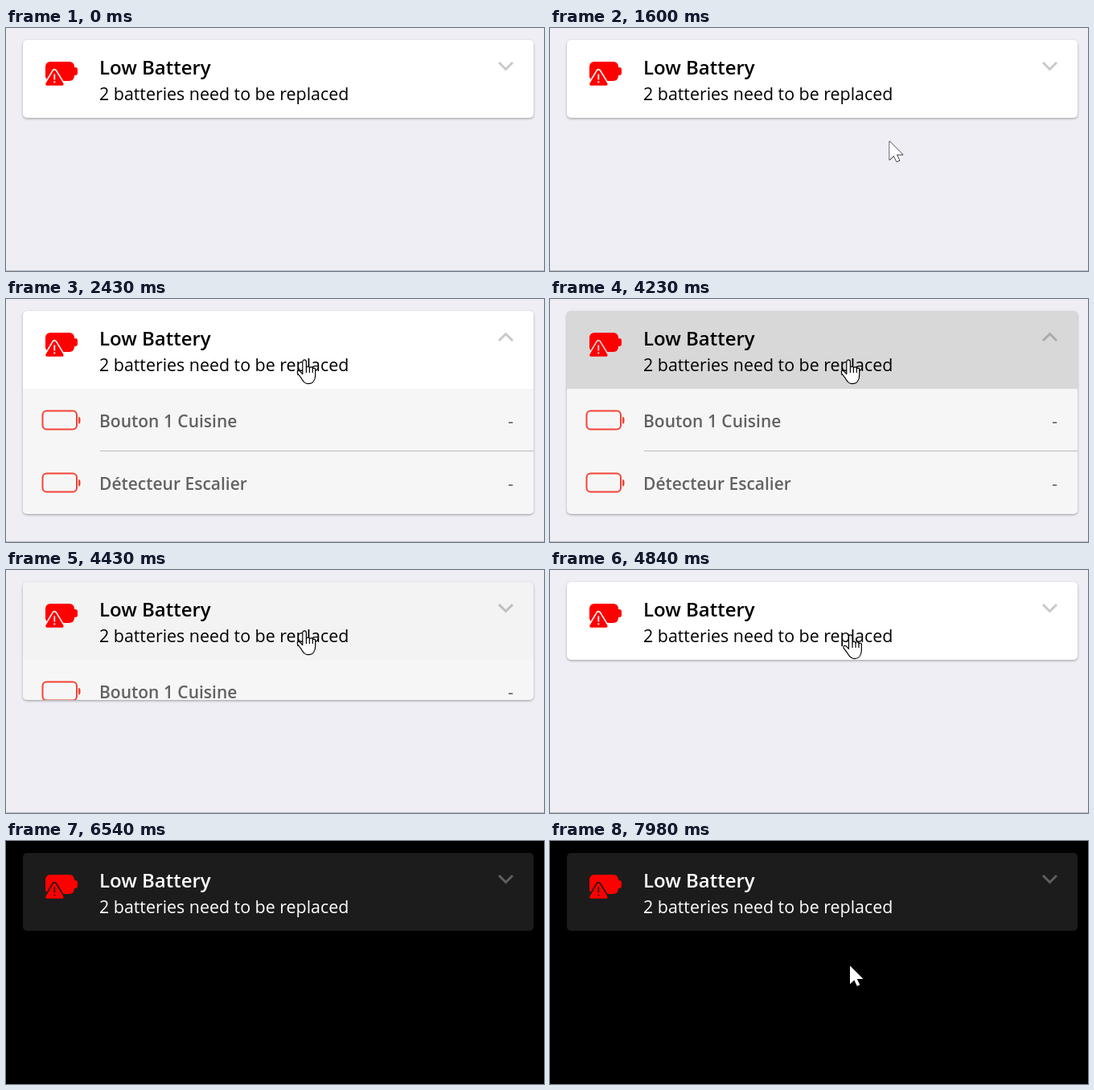
Write an HTML page with a canvas that moves like this. It is 669x303 px and loops after 8 s.

```html
<!DOCTYPE html>
<html lang="en">
<head>
<meta charset="utf-8">
<title>Low Battery card</title>
<style>
  html, body { margin: 0; width: 100%; height: 100%; overflow: hidden; background: #efeef4; }
  canvas { display: block; width: 669px; height: 303px; }
</style>
</head>
<body>
<canvas id="stage" width="669" height="303"></canvas>
<script>
const ctx = document.getElementById('stage').getContext('2d');
const LOOP = 8000;
const CARD = { x: 21, y: 15, w: 635, header: 97, list: 156 };
const LIGHT = { page: '#efeef4', header: [255, 255, 255], text: '#000', chevron: 'rgba(0,0,0,.21)' };
const DARK = { page: '#000', header: [28, 28, 28], text: '#fff', chevron: '#5e5e64' };
const PRESSED = 216;
const FONT = '"Open Sans", "Noto Sans", sans-serif';

const handShape = new Path2D('M7.8 18.5V3.2a2.3 2.3 0 0 1 4.6 0V11a2 2 0 0 1 4 .4a2 2 0 0 1 3.9 1a1.8 1.8 0 0 1 3.4 1.4V20c0 6-3 10.7-9 10.7c-4 0-6.500-3-8.500-7L1.500 17.500c-1.200-2.500 1.500-4 3.300-2.200z');
const handCreases = new Path2D('M12.4 11v6M16.400 11.400v5.600M20.300 12.400v4.600');
const arrowShape = new Path2D('M.5 .5V23.500l5.300-5 3.600 7.400 3.400-1.600-3.500-7.300h7.700z');

// CSS "ease" curve: cubic-bezier(.25, .1, .25, 1)
function ease(x) {
  if (x <= 0) return 0;
  if (x >= 1) return 1;
  let lo = 0, hi = 1, s;
  for (let i = 0; i < 24; i++) {
    s = (lo + hi) / 2;
    const bx = .75 * s * (1 - s) + s ** 3;
    if (bx < x) lo = s; else hi = s;
  }
  return .3 * s * (1 - s) ** 2 + 3 * s * s * (1 - s) + s ** 3;
}

// Index of the current step out of `count`, spread evenly from start to end
const stepAt = (t, start, end, count) =>
  Math.min(count - 1, Math.floor((t - start) / (end - start) * (count - 1) + .001));

const lerp = (a, b, p) => a + (b - a) * p;

// The panel advances every 70 ms after the press
function toggle(t, press) {
  const begin = press + 120;
  if (t < begin) return 0;
  const held = begin + Math.floor((t - begin) / 70) * 70;
  return ease((held - press - 70) / 300);
}

function cursorAt(t) {
  const rest = { x: 370, y: 76 };
  if (t >= 7350) {
    const p = 1 - (1 - stepAt(t, 7350, 7980, 10) / 9) ** 1.8;
    return { x: lerp(510, 372.5, p), y: lerp(284, 155, p) };
  }
  if (t < 1190 || t >= 5460) return null;
  if (t < 1950) {
    const p = 1 - (1 - stepAt(t, 1190, 1950, 12) / 11) ** 1.8;
    return { x: lerp(524, rest.x, p), y: lerp(269, rest.y, p) };
  }
  if (t < 4840) return rest;
  const u = (stepAt(t, 4840, 5460, 10) + 1) / 10;
  return { x: rest.x + 265 * u ** 2, y: rest.y + 245 * u ** 1.7 };
}

function box(x, y, w, h, r) {
  ctx.beginPath();
  ctx.roundRect(x, y, w, h, r);
}

function line(points, color, width, cap = 'butt') {
  ctx.beginPath();
  points.forEach(([x, y]) => ctx.lineTo(x, y));
  ctx.strokeStyle = color;
  ctx.lineWidth = width;
  ctx.lineCap = cap;
  ctx.lineJoin = 'miter';
  ctx.stroke();
}

function label(text, x, y, size, weight, color) {
  ctx.font = `${weight} ${size}px ${FONT}`;
  ctx.fillStyle = color;
  ctx.fillText(text, x, y);
}

function alertIcon(back) {
  ctx.fillStyle = '#f00';
  box(49, 42, 36, 24, 6);
  ctx.fill();
  box(82, 49, 7, 10, 3);
  ctx.fill();
  ctx.beginPath();
  ctx.moveTo(60.3, 54.5);
  ctx.lineTo(69.8, 70);
  ctx.lineTo(51, 70);
  ctx.closePath();
  ctx.lineJoin = 'round';
  ctx.strokeStyle = back;
  ctx.lineWidth = 7;
  ctx.stroke();
  ctx.strokeStyle = '#f00';
  ctx.lineWidth = 3.6;
  ctx.stroke();
  ctx.fill();
  line([[60.3, 57.5], [60.3, 64.5]], back, 1.8);
  line([[60.3, 66.4], [60.3, 68.4]], back, 2);
}

function row(name, y) {
  box(45.5, y - 12, 42.500, 23, 5);
  ctx.strokeStyle = '#f44336';
  ctx.lineWidth = 2;
  ctx.stroke();
  ctx.fillStyle = '#f44336';
  box(90, y - 4.5, 2.5, 8.5, [0, 2.5, 2.5, 0]);
  ctx.fill();
  label(name, 116, y + 8.5, 21, 600, '#626262');
  label('-', 624, y + 8.5, 22, 400, '#626262');
}

function card(theme, open, press, isOpen) {
  const { x, y, w, header, list } = CARD;
  const height = header + Math.round(list * open);
  const back = `rgb(${theme.header.map(c => Math.round(lerp(c, PRESSED, press)))})`;

  ctx.save();
  ctx.shadowColor = 'rgba(0,0,0,.32)';
  ctx.shadowBlur = 3;
  ctx.shadowOffsetY = 1.3;
  ctx.fillStyle = back;
  box(x, y, w, height, 5);
  ctx.fill();
  ctx.restore();

  ctx.save();
  box(x, y, w, height, 5);
  ctx.clip();
  if (open > 0) {
    ctx.fillStyle = '#f6f6f6';
    ctx.fillRect(x, y + header, w, list);
    row('Bouton 1 Cuisine', 151.5);
    row('Détecteur Escalier', 229.5);
    ctx.fillStyle = '#b9b9b9';
    ctx.fillRect(117, 189, 539, 1);
  }
  ctx.restore();

  alertIcon(back);
  label('Low Battery', 116, 58, 24, 600, theme.text);
  label('2 batteries need to be replaced', 116, 90, 21.4, 400, theme.text);
  const [edge, tip] = isOpen ? [52, 43.5] : [43, 51.5];
  line([[613, edge], [621.5, tip], [630, edge]], theme.chevron, 3);
}

function cursor({ x, y }) {
  const overCard = y < CARD.y + CARD.header;
  ctx.save();
  ctx.translate(overCard ? x - 9 : x, overCard ? y - 1 : y);
  ctx.fillStyle = '#fff';
  ctx.strokeStyle = '#000';
  ctx.lineWidth = 1.2;
  ctx.lineJoin = 'round';
  const shape = overCard ? handShape : arrowShape;
  if (!overCard) ctx.stroke(shape);
  ctx.fill(shape);
  if (overCard) {
    ctx.stroke(shape);
    ctx.stroke(handCreases);
  }
  ctx.restore();
}

function draw(t) {
  const dark = t >= 6540;
  const theme = dark ? DARK : LIGHT;
  const opening = toggle(t, 2030);
  const closing = toggle(t, 4230);
  let press = 0;
  if (t >= 2030 && t < 4230) press = 1 - opening;
  else if (t >= 4230) press = 1 - closing;

  ctx.fillStyle = theme.page;
  ctx.fillRect(0, 0, 669, 303);
  if (!dark) {
    ctx.fillStyle = '#bdbdc1';
    ctx.fillRect(0, 302, 669, 1);
  }
  card(theme, opening - closing, press, t >= 2150 && t < 4360);
  const pointer = cursorAt(t);
  if (pointer) cursor(pointer);
}

const started = performance.now();
function tick() {
  draw((performance.now() - started) % LOOP);
  requestAnimationFrame(tick);
}
tick();
</script>
</body>
</html>
```
